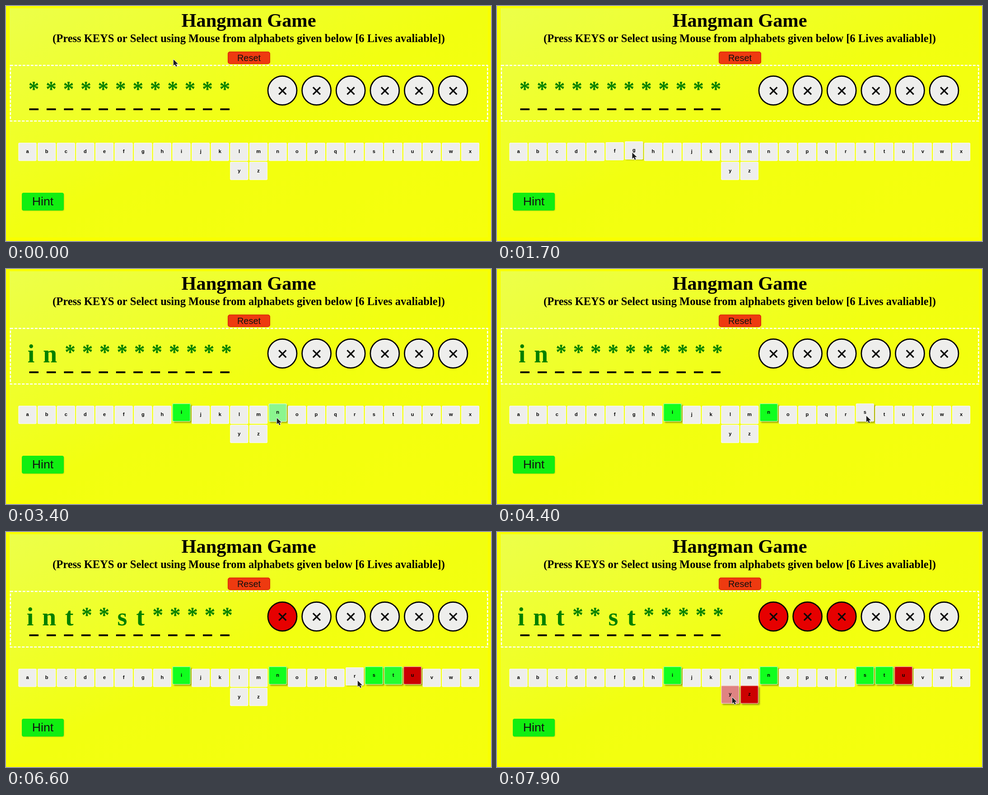
An HTML page with a canvas for the animation above (8000 ms loop, 1074 by 521 pixels).

```html
<!DOCTYPE html>
<html lang="en">
<head>
<meta charset="utf-8">
<title>Hangman Game</title>
<style>
  html, body { margin: 0; width: 100%; height: 100%; overflow: hidden; background: #f9ff00; }
  canvas { display: block; }
</style>
</head>
<body>
<canvas id="stage" width="1074" height="521"></canvas>
<script>
const ctx = document.getElementById('stage').getContext('2d');
const LOOP = 8000, STEP = 100;
const SERIF = '"Liberation Serif", serif', SANS = '"Liberation Sans", sans-serif';
const GREY = [238, 238, 236], GREEN = [17, 255, 30], RED = [204, 0, 0];

// Letter, click time, hit or miss
const clicks = [
  { letter: 'i', at: 2000, hit: true },
  { letter: 'n', at: 3300, hit: true },
  { letter: 's', at: 4500, hit: true },
  { letter: 'u', at: 5400, hit: false },
  { letter: 't', at: 6200, hit: true },
  { letter: 'z', at: 7000, hit: false },
  { letter: 'y', at: 7800, hit: false }
];
const slots = 'int**st*****';
const advance = { '*': 20, i: 15, n: 32, s: 23, t: 20.5 };
const gap = 18.45;

// Pointer path: time, x, y
const path = [
  [0, 370, 118], [200, 370, 118], [800, 57, 322], [1100, 107, 318],
  [1200, 110, 319], [2000, 386, 327], [2300, 384, 325], [2700, 384, 325],
  [3300, 600, 331], [3600, 596, 326], [4200, 828, 326], [4400, 817, 325],
  [4500, 817, 325], [5000, 890, 327], [5300, 899, 323], [5600, 908, 332],
  [6000, 914, 334], [6100, 908, 333], [6200, 866, 330], [6300, 856, 328],
  [6600, 778, 329], [7000, 562, 363], [7300, 560, 372], [7600, 528, 374],
  [7800, 520, 366], [7900, 520, 366]
];

const keys = [...'abcdefghijklmnopqrstuvwxyz'].map((letter, i) => ({
  letter,
  x: i < 24 ? 47.5 + i * 42.63 : 516.3 + (i - 24) * 42.63,
  y: i < 24 ? 323.3 : 365.6,
  click: clicks.find(c => c.letter === letter)
}));

function pointerAt(t) {
  const i = path.findIndex(p => p[0] > t);
  if (i < 0) return path[path.length - 1].slice(1);
  const [t0, x0, y0] = path[i - 1], [t1, x1, y1] = path[i];
  const p = (t - t0) / (t1 - t0), e = p * p * (3 - 2 * p);
  return [x0 + (x1 - x0) * e, y0 + (y1 - y0) * e];
}

function liftAt(key, t) {
  let lift = 0;
  for (let s = 0; s <= t; s += STEP) {
    const [x, y] = pointerAt(s);
    const over = Math.abs(x - key.x) < 20 && Math.abs(y - key.y) < 20;
    const raised = over || (key.click && s > key.click.at);
    lift += ((raised ? 1 : 0) - lift) * 0.6;
  }
  return lift;
}

function keyColor(click, t) {
  if (!click || t <= click.at) return `rgb(${GREY})`;
  const p = 1 - 0.55 ** ((t - click.at) / STEP);
  const end = click.hit ? GREEN : RED;
  return `rgb(${GREY.map((v, i) => Math.round(v + (end[i] - v) * p))})`;
}

function text(str, x, y, font, color = '#000') {
  ctx.font = font;
  ctx.fillStyle = color;
  ctx.textAlign = 'center';
  ctx.fillText(str, x, y);
}

function box(x, y, w, h, r, fill, shadow = 0) {
  ctx.save();
  ctx.shadowColor = `rgba(60, 60, 0, ${0.45 * shadow})`;
  ctx.shadowOffsetX = ctx.shadowOffsetY = 3 * shadow;
  ctx.shadowBlur = 3 * shadow;
  ctx.fillStyle = fill;
  ctx.beginPath();
  ctx.roundRect(x, y, w, h, r);
  ctx.fill();
  ctx.restore();
}

function outline(color, width) {
  ctx.strokeStyle = color;
  ctx.lineWidth = width;
  ctx.stroke();
}

function drawPage() {
  ctx.fillStyle = '#f9ff00';
  ctx.fillRect(0, 0, 1074, 521);
  const glow = ctx.createLinearGradient(339, -154, 735, 672);
  glow.addColorStop(0, '#ecff4a');
  glow.addColorStop(0.5, '#f2ff10');
  glow.addColorStop(1, '#f6ff0c');
  ctx.fillStyle = glow;
  ctx.fillRect(8, 5, 1059, 508);

  text('Hangman Game', 537.5, 46, `bold 42.4px ${SERIF}`);
  text('(Press KEYS or Select using Mouse from alphabets given below [6 Lives avaliable])',
    537.5, 80, `bold 24.5px ${SERIF}`);

  box(491, 101, 94, 27.5, 5, '#ee3a10');
  ctx.beginPath();
  ctx.roundRect(491.5, 101.5, 93, 26.5, 5);
  outline('#d01800', 1);
  text('Reset', 538, 122, `20px ${SANS}`, '#111');
  box(35, 414, 93, 39.5, 4, '#11ee11', 0.4);
  text('Hint', 81.5, 442, `26.7px ${SANS}`, '#111');

  ctx.save();
  ctx.setLineDash([6, 3]);
  ctx.strokeStyle = '#fff';
  ctx.lineWidth = 2.6;
  ctx.strokeRect(9.8, 131.8, 1056.6, 123.2);
  ctx.restore();
}

function drawWord(t) {
  const known = clicks.filter(c => c.hit && t > c.at).map(c => c.letter);
  const shown = [...slots].map(c => known.includes(c) ? c : '*');
  const total = shown.reduce((sum, c) => sum + advance[c] + gap, -gap);
  let x = 273 - total / 2;
  shown.forEach((c, i) => {
    const star = c === '*';
    text(c, x + advance[c] / 2, star ? 199.7 : 206.5, `bold ${star ? 48 : 56}px ${SERIF}`, '#008000');
    x += advance[c] + gap;
    ctx.fillStyle = '#000';
    ctx.fillRect(51.5 + i * 38.45, 227, 20.5, 4);
  });
}

function drawLives(t) {
  const misses = clicks.filter(c => !c.hit && t > c.at).length;
  for (let i = 0; i < 6; i++) {
    const x = 612 + i * 75.6, y = 187.3;
    ctx.beginPath();
    ctx.arc(x, y, 32, 0, 7);
    ctx.fillStyle = i < misses ? '#e60000' : '#eeeeec';
    ctx.fill();
    outline('#000', 2.7);
    ctx.beginPath();
    for (const s of [-1, 1]) {
      ctx.moveTo(x + 0.3 - 8, y + 0.9 - 8 * s);
      ctx.lineTo(x + 0.3 + 8, y + 0.9 + 8 * s);
    }
    outline('#080808', 3.3);
  }
}

function drawKey(key, t) {
  const lift = liftAt(key, t), y = key.y - 5.2 * lift;
  box(key.x - 20, y - 20, 40, 40, 2, keyColor(key.click, t), lift);
  ctx.beginPath();
  ctx.roundRect(key.x - 19.5, y - 19.5, 39, 39, 2);
  outline('rgba(255, 255, 240, 0.7)', 1.2);
  text(key.letter, key.x, y + 3, `bold 11px ${SANS}`);
}

function drawPointer(t) {
  const [x, y] = pointerAt(t);
  ctx.save();
  ctx.translate(x + 0.8, y + 0.5);
  const arrow = new Path2D('M0 0V13.8L3.2 10.9L5.6 16L8 14.9L5.7 10H10.2Z');
  ctx.lineJoin = 'round';
  ctx.strokeStyle = '#fff';
  ctx.lineWidth = 1.6;
  ctx.stroke(arrow);
  ctx.fillStyle = '#1c1c1c';
  ctx.fill(arrow);
  ctx.restore();
}

function draw(now) {
  const t = Math.floor((now % LOOP) / STEP) * STEP;
  drawPage();
  drawWord(t);
  drawLives(t);
  keys.forEach(key => drawKey(key, t));
  drawPointer(t);
}

let start;
function tick(now) {
  start ??= now;
  draw(now - start);
  requestAnimationFrame(tick);
}
draw(0);
requestAnimationFrame(tick);
</script>
</body>
</html>
```
